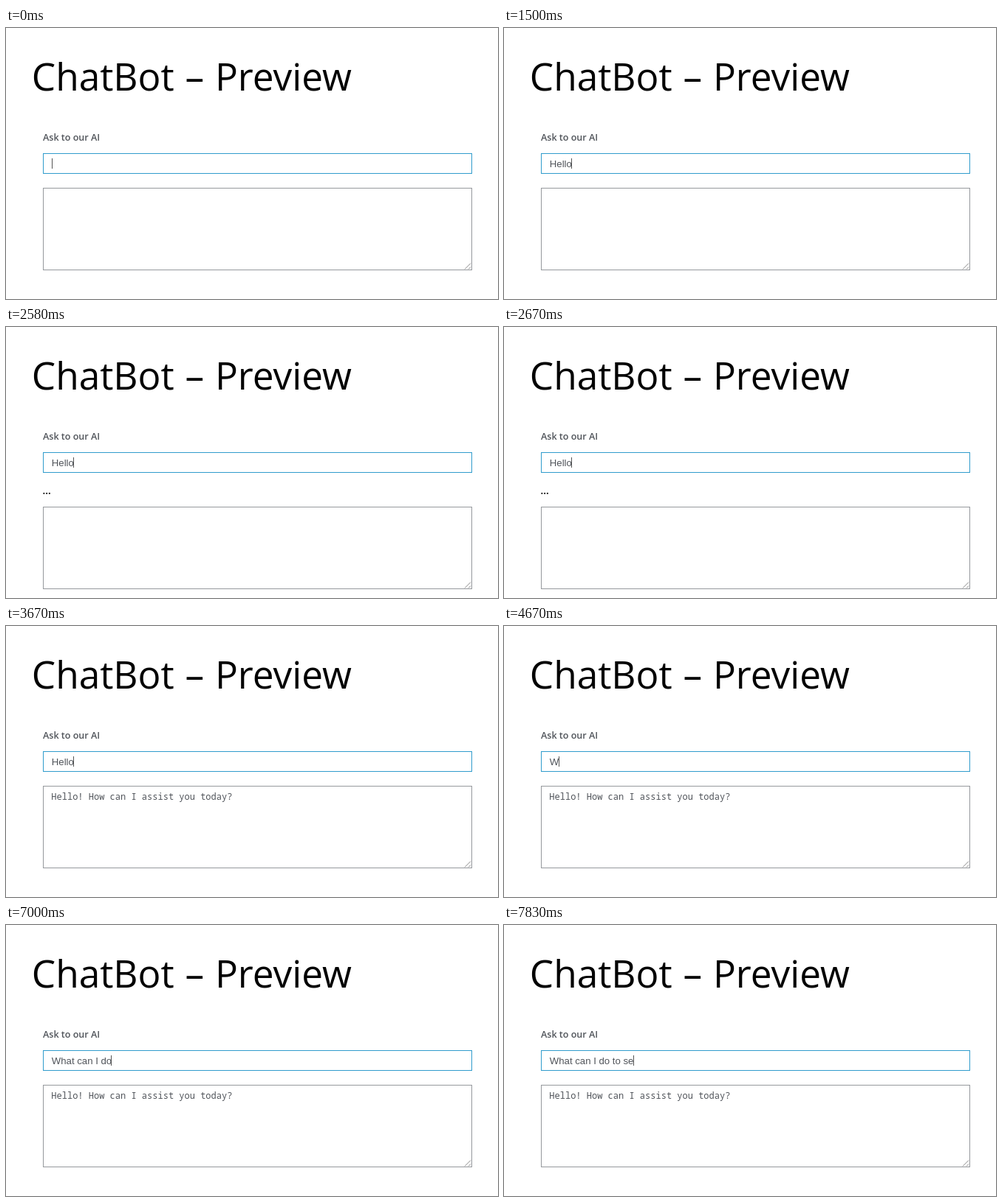
Animation of 666x368 px, one loop 8000 ms. Source, as an HTML page:

```html
<!DOCTYPE html>
<html lang="en">
<head>
<meta charset="utf-8">
<title>ChatBot – Preview</title>
<style>
  html, body { margin: 0; width: 100%; height: 100%; overflow: hidden; background: #fff; }
  svg { display: block; }
  text { white-space: pre; fill: #50545a; }
  .title { font: 51.3px "Open Sans", "Noto Sans", sans-serif; word-spacing: 1.5px; fill: #000; }
  .label { font: 600 12.55px "Open Sans", "Noto Sans", sans-serif; }
  .dots { font: 700 13px "Open Sans", "Noto Sans", sans-serif; fill: #222; }
  .typed { font: 13.2px "Liberation Sans", Arial, sans-serif; }
  .reply { font: 12.03px "Noto Sans Mono", "DejaVu Sans Mono", monospace; }
  .frame { fill: #fff; stroke: #96999d; }
  .focus { stroke: #309ccc; }
</style>
</head>
<body>
<svg width="666" height="368" viewBox="0 0 666 368">
  <text class="title" x="34.8" y="84.6">ChatBot – Preview</text>
  <text class="label" x="50" y="153">Ask to our AI</text>
  <rect class="frame focus" x="50.5" y="170.5" width="580" height="27"/>
  <rect id="selection" x="62" y="177" height="15" fill="#0078d7"/>
  <text id="typed" class="typed" x="61.8" y="188.5"></text>
  <rect id="caret" y="177" width="1" height="14" fill="#555"/>
  <text id="dots" class="dots" x="49.5" y="227">...</text>
  <g id="answer">
    <rect class="frame" x="50.5" y="217.5" width="580" height="111"/>
    <path d="M621 327.5l8-8M626 327.5l3-3" stroke="#888" fill="none"/>
    <text id="reply" class="reply" x="61.3" y="235.5">Hello! How can I assist you today?</text>
  </g>
</svg>
<script>
const LOOP = 8000, BLINK = 500;
const THINK = 1670, REPLY = 2920, SELECT = 4170, RETYPE = 4670;

// Each message lists when its next characters appear.
const messages = [
  { text: "Hello", keys: [670, 830, 1170, 1330, 1500] },
  { text: "What can I do to se",
    keys: [4670, 5580, 5750, 5830, 6000, 6080, 6170, 6330, 6580,
           6670, 6830, 6830, 7000, 7330, 7420, 7500, 7580, 7670, 7830] }
];
// Moments from which the caret blinks anew, besides the key presses.
const caretResets = [-330, 2580];

const el = id => document.getElementById(id);
const [typed, caret, selection, dots, answer, reply] =
  ["typed", "caret", "selection", "dots", "answer", "reply"].map(el);
const show = (node, on) => node.setAttribute("visibility", on ? "visible" : "hidden");

function draw(t) {
  const { text, keys } = messages[t >= RETYPE ? 1 : 0];
  const selected = t >= SELECT && t < RETYPE;
  const thinking = t >= THINK && t < REPLY;

  typed.textContent = text.slice(0, keys.filter(k => k <= t).length);
  typed.style.fill = selected ? "#fff" : "";
  const width = typed.textContent ? typed.getComputedTextLength() : 0;

  const lastReset = Math.max(...[...keys, ...caretResets].filter(k => k <= t));
  caret.setAttribute("x", Math.round(61.6 + width - (width ? 0.5 : 0)));
  show(caret, !selected && (t - lastReset) % (2 * BLINK) < BLINK);
  selection.setAttribute("width", Math.round(width));
  show(selection, selected);

  show(dots, thinking);
  answer.setAttribute("transform", `translate(0 ${thinking ? 27 : 0})`);
  show(reply, t >= REPLY);
}

function tick() {
  draw(performance.now() % LOOP);
  requestAnimationFrame(tick);
}
tick();
</script>
</body>
</html>
```
